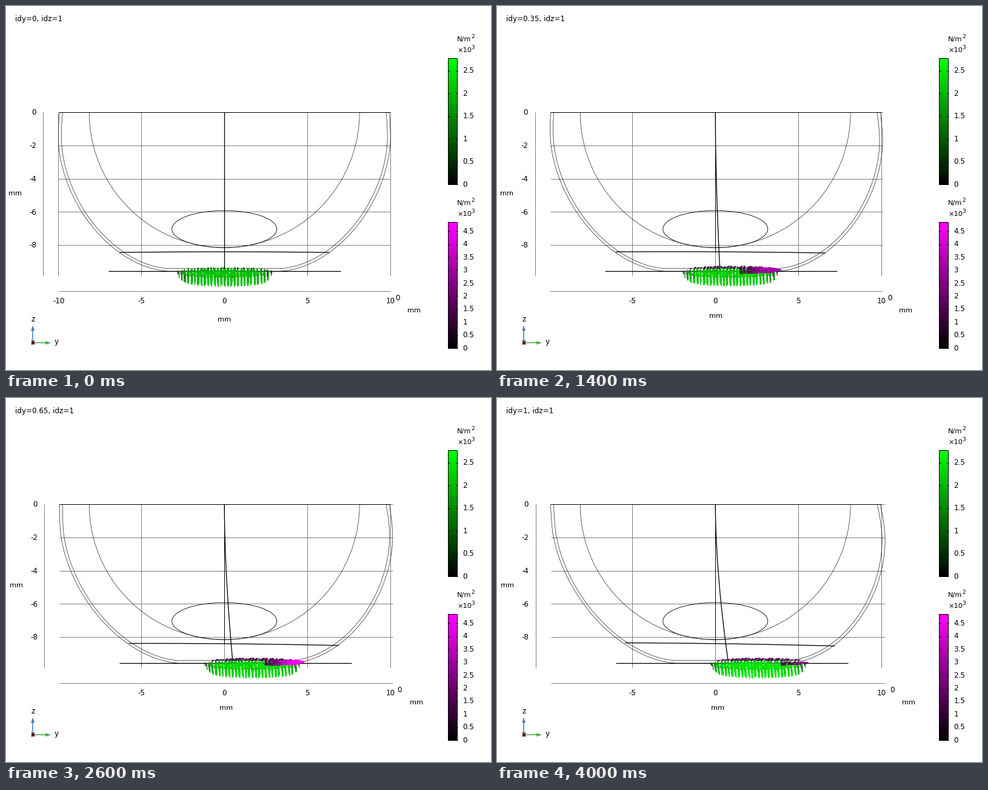
Recreate the animation shown at these times as a matplotlib script. Size 800 by 600 pixels, loop 4200 ms.

```python
import numpy as np
import matplotlib.pyplot as plt
from matplotlib.animation import FuncAnimation
from matplotlib.collections import LineCollection, PolyCollection
from matplotlib.patches import Ellipse, Rectangle

FRAMES, INTERVAL = 21, 200
PX = 0.72                     # points per pixel at 100 dpi
CX, TOP, FLOOR, MM = 360, 175, 437, 27.4
GREY = "#808080"

plt.rcParams["font.family"] = "DejaVu Sans"
fig = plt.figure(figsize=(8, 6), dpi=100, facecolor="white")
ax = fig.add_axes([0, 0, 1, 1])
ax.axis("off")


def label(x, y, s, size=12, ha="left"):
    return ax.text(x, y, s, fontsize=size * PX, ha=ha, va="baseline", zorder=9)


def line(xs, ys, color="black", width=1.0, z=2):
    return ax.plot(xs, ys, color=color, lw=width * PX, zorder=z,
                   solid_capstyle="butt")[0]


def colorbar(top, rgb, per_unit, last):
    bottom = top + 208
    ramp = np.linspace(1, 0, 208)[:, None, None] * np.array(rgb)
    ax.imshow(ramp, extent=(729, 744, bottom, top), aspect="auto", zorder=3)
    ax.add_patch(Rectangle((729, top), 15, 208, fill=False, ec="black",
                           lw=PX, zorder=5))
    for v in np.arange(0, last + 0.1, 0.5):
        y = bottom - v * per_unit
        line([729, 732], [y, y], z=5)
        line([742, 745], [y, y], z=5)
        label(753, y + 3.6, f"{v:g}")
    for dy, text, power in ((-28, "N/m", "2"), (-10.5, "×10", "3")):
        label(744, top + dy, text, 11.4)
        label(767.5, top + dy - 5, power, 9)


def triad():
    ox, oy = 44, 555
    blue, green = "#4682be", "#50aa46"
    line([ox, ox], [oy, 534], blue, 1.6)
    ax.fill([ox - 3, ox + 3, ox], [535, 535, 526.5], color=blue, lw=0)
    line([ox, 66], [oy, oy], green, 1.6)
    ax.fill([65, 65, 74], [oy - 3, oy + 3, oy], color=green, lw=0)
    ax.add_patch(Rectangle((41.5, 552.5), 5, 5, color="#c01048", lw=0, zorder=4))
    label(44, 558, "x", 12, "center")
    label(44, 520, "z", 12, "center")
    label(79, 557, "y")


def shear(y, d):
    """Sideways displacement of the shell at height y."""
    return MM * d * (np.clip((y - TOP) / (FLOOR - TOP), 0, 1)) ** 0.92


def shell(inset, d):
    """Half-section of the pressed shell, bulging sides over a flat base."""
    up = np.linspace(TOP, 217, 20)
    a = np.linspace(0, np.pi / 2, 90)
    half, flat, power = 274 - inset, 90, 1.11
    right_x = np.r_[half - 2.3 * ((217 - up) / 42) ** 2,
                    flat + (half - flat) * np.cos(a) ** power]
    right_y = np.r_[up, 217 + (220 - inset * 0.9) * np.sin(a) ** power]
    x = np.r_[CX + right_x, CX - right_x[::-1]]
    y = np.r_[right_y, right_y[::-1]]
    return x + shear(y, d), y


# Fixed scenery
colorbar(86, (0, 1, 0), 75, 2.5)
colorbar(356, (1, 0, 1), 42.9, 4.5)
triad()
for v in (-5, 0, 5, 10):
    x = CX + v * MM
    line([x, x], [TOP, 445], GREY, 1, 1)
    label(x - 0.3, 490, str(v), 12, "center")
theta = np.linspace(0, np.pi, 160)
line(CX + 223 * np.cos(theta), TOP + 223 * np.sin(theta), width=0.6)
ax.add_patch(Ellipse((CX, 367.5), 173, 61, fill=False, ec="black",
                     lw=0.85 * PX, zorder=2))
line([CX, CX], [TOP, 405])
line([88, 634], [TOP, TOP])

# Moving parts
title = label(15, 25, "")
rows = [line([], [], GREY, 1, 1) for _ in range(6)]
row_y = [TOP + 54.75 * i for i in range(5)] + [470]
z_ticks = [label(50, y + 4.2, str(-2 * i), 12, "right")
           for i, y in enumerate(row_y[:5])]
left_axis = line([], [], GREY, 1, 1)
edge_tick = label(87, 490, "-10", 12, "center")
edge_line = line([86, 86], [TOP, 445], GREY, 1, 1)
depth_tick = label(642, 485, "0")
unit_left = label(4, 312, "mm", 11.4)
unit_mid = label(360, 519.5, "mm", 11.4, "center")
unit_right = label(662, 505, "mm", 11.4)
outer, inner = line([], [], width=0.6), line([], [], width=0.6)
membrane, plate, axis = (line([], [], width=1.3) for _ in range(3))

# Contact nodes on a disk seen almost edge-on
rng = np.random.default_rng(4)
u, v = np.meshgrid(np.linspace(-0.98, 0.98, 29), np.linspace(-0.95, 0.95, 12))
u = (u + rng.uniform(-0.018, 0.018, u.shape)).ravel()
v = (v + rng.uniform(-0.07, 0.07, v.shape)).ravel()
keep = u ** 2 + v ** 2 < 1
u, v = u[keep], v[keep]
pressure = np.sqrt(1 - (u ** 2 + v ** 2) ** 4)

press_shafts, drag_shafts = (LineCollection([], linewidths=w * PX, zorder=z)
                             for w, z in ((1.2, 4), (1.1, 6)))
press_heads, drag_heads = (PolyCollection([], linewidths=0, zorder=z)
                           for z in (5, 7))
for c in (press_shafts, press_heads, drag_shafts, drag_heads):
    ax.add_collection(c, autolim=False)


def points(*pairs):
    return np.stack([np.stack(p, axis=-1) for p in pairs], axis=1)


def draw_contact(d):
    x, y = CX + 70 * d + 78 * u, 435 - 6.5 * v
    size = 0.3 + 0.7 * pressure
    rgb = np.zeros((len(u), 3))
    rgb[:, 1] = np.clip((0.77 + 0.14 * d) * pressure, 0, 1)
    press_shafts.set_segments(points((x, y + 3), (x + 2 * d, y + 3 + 20 * pressure)))
    press_shafts.set_color(rgb)
    press_heads.set_verts(points((x, y), (x - 2.2 * size, y + 8 * size),
                                 (x + 2.2 * size, y + 8 * size)))
    press_heads.set_facecolor(rgb)

    # Drag grows towards the leading edge; the far rim carries faint arrows.
    peak = np.interp(d, [0, 0.2, 0.5, 0.65, 0.9, 1], [0, 0.4, 0.88, 1, 1, 0.6])
    drag = peak * np.clip((u + 0.1 - 0.4 * d) / 0.6, 0, 1)
    rim = (v > 0.4) & (u > 1.2 - 6 * d)
    shown = (d > 0) & (rim | ((drag > 0.15) & (v < 1.4 - 1.4 * d)))
    m = np.maximum(drag * (v < 1.4 - 1.4 * d), 0.32 * min(1, 0.3 + d))[shown]
    x, y = x[shown], y[shown]
    tip = x + 3 + 8 * m
    h = 0.9 + 0.7 * m
    rgb = np.zeros((len(m), 3))
    rgb[:, 0] = rgb[:, 2] = m
    drag_shafts.set_segments(points((x - 3 * m, y), (tip - 3, y)))
    drag_shafts.set_color(rgb)
    drag_heads.set_verts(points((tip, y), (tip - 4 * h, y - h), (tip - 4 * h, y + h)))
    drag_heads.set_facecolor(rgb)


def update(frame):
    d = round(frame / (FRAMES - 1), 2)
    title.set_text(f"idy={d:g}, idz=1")

    ox, oy = shell(0, d)
    outer.set_data(ox, oy)
    inner.set_data(*shell(5, d))
    left, right = ox.min(), ox.max()
    for r, y in zip(rows, row_y):
        r.set_data([left, right], [y, y])
    left_axis.set_data([left - 25, left - 25], [TOP, 445])

    shift = round(left - 86)
    for t in z_ticks:
        t.set_x(50 + shift)
    unit_left.set_x(4 + shift)
    unit_right.set_x(int(np.interp(d, [0, 0.2, 0.35, 0.5, 0.65, 0.9, 1],
                                   [662, 663, 663, 665, 666, 667, 668])))
    depth_tick.set_x(round(641.5 + 6 * d))
    unit_mid.set_position(((left + right) / 2 - 0.5, 519.5 if d == 0 else 514))
    edge_tick.set_visible(d == 0)
    edge_line.set_visible(d == 0)

    s = np.linspace(-1, 1, 30)
    membrane.set_data(CX + 173 * s + 24 * d, 405 + s ** 2 + 2.6 * d * s)
    plate.set_data([168.5 + MM * d, 551.5 + MM * d], [FLOOR, FLOOR])
    t = np.linspace(0, 1, 50)
    axis.set_data(CX + 21.5 * d * t ** 1.75, TOP + (FLOOR - TOP) * t)
    draw_contact(d)
    return []


# A fractional offset keeps straight lines snapping to whole pixel rows.
ax.set_xlim(-0.2, 799.8)
ax.set_ylim(599.8, -0.2)
anim = FuncAnimation(fig, update, frames=FRAMES, interval=INTERVAL,
                     repeat=True, repeat_delay=0, blit=False)
plt.show()
```
